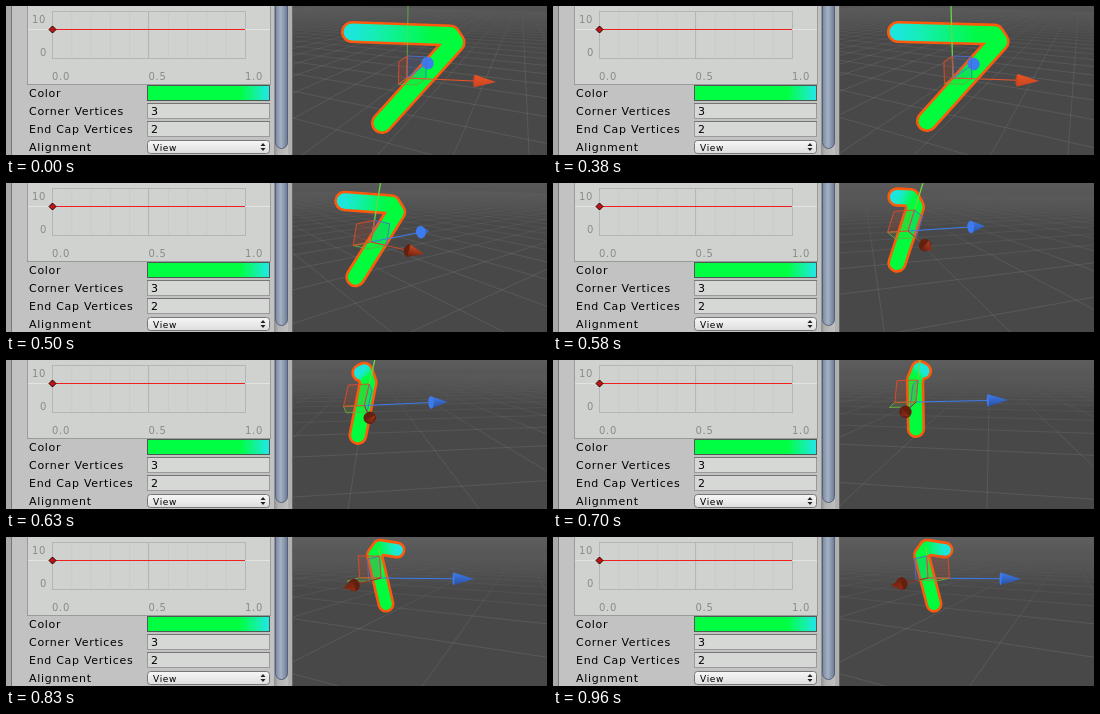
An HTML page with a canvas for the animation above (1.07 s loop, 541 by 149 pixels).

```html
<!DOCTYPE html>
<html lang="en">
<head>
<meta charset="utf-8">
<title>Line corner settings</title>
<style>
html, body { margin: 0; width: 100%; height: 100%; overflow: hidden; background: #c2c2c2; }
canvas { display: block; width: 541px; height: 149px; }
</style>
</head>
<body>
<canvas id="stage" width="541" height="149"></canvas>
<script>
const ctx = document.getElementById('stage').getContext('2d');
const W = 541, H = 149, LEFT = 287, LOOP = 1070;
const FOCAL = 260, CENTER = 400, DEPTH = 3.6, AXIS = 92;
const BLUE = '#3d7cee', GREEN = '#62dc3c';

// The view only refreshes at these moments.
const steps = [0, 380, 400, 420, 500, 540, 580, 630, 665, 700, 780, 805, 830, 890];

// a, b, c: line points; w: half width; o: pivot; x, z: arrow vectors; y: top of the green axis
const poses = [
  { at: 0,   a: [346, 26], b: [450, 35], c: [376, 117], w: 11,   o: [401, 72], x: [89, 4],  z: [22, -16], y: [402, 0],  h: -12, yaw: 24 },
  { at: 380, a: [345, 26], b: [447, 34], c: [374, 115], w: 11,   o: [400, 72], x: [86, 3],  z: [22, -15], y: [398, 0],  h: -12, yaw: 26 },
  { at: 420, a: [333, 22], b: [419, 33], c: [355, 108], w: 10.8, o: [375, 70], x: [82, 4],  z: [39, -18], y: [379, 0],  h: -9,  yaw: 33 },
  { at: 580, a: [344, 14], b: [363, 22], c: [344, 80],  w: 9.7,  o: [355, 48], x: [24, 20], z: [77, -5],  y: [370, 0],  h: 4,   yaw: 71 },
  { at: 700, a: [370, 11], b: [362, 18], c: [363, 69],  w: 9.1,  o: [363, 42], x: [-15, 14], z: [92, -2], y: [367, 0],  h: 8,   yaw: 98 },
  { at: 830, a: [391, 13], b: [368, 16], c: [380, 67],  w: 8.5,  o: [375, 41], x: [-38, 10], z: [93, 1],  y: [373, 10], h: 10,  yaw: 114 },
  { at: 890, a: [392, 13], b: [368, 16], c: [381, 67],  w: 8.5,  o: [375, 41], x: [-37, 8], z: [93, 1],   y: [373, 10], h: 10,  yaw: 114 }
];

const mix = (p, q, k) => Array.isArray(p) ? p.map((v, i) => mix(v, q[i], k)) : p + (q - p) * k;
const add = (p, q) => [p[0] + q[0], p[1] + q[1]];
const mul = (p, k) => [p[0] * k, p[1] * k];
const sub = (p, q) => add(p, mul(q, -1));
const len = p => Math.hypot(p[0], p[1]);
const unit = p => mul(p, 1 / len(p));

function poseAt(time) {
  const t = steps.filter(s => s <= time).pop();
  let i = 0;
  while (i < poses.length - 2 && poses[i + 1].at <= t) i++;
  const p = poses[i], q = poses[i + 1];
  const k = (t - p.at) / (q.at - p.at);
  const out = {};
  for (const key in p) out[key] = mix(p[key], q[key], k);
  return out;
}

function box(x, y, w, h, fill) {
  ctx.fillStyle = fill;
  ctx.fillRect(x, y, w, h);
}

function path(points, close) {
  ctx.beginPath();
  points.forEach(p => ctx.lineTo(p[0], p[1]));
  if (close) ctx.closePath();
}

function line(p, q, color, width = 1) {
  path([p, q]);
  ctx.strokeStyle = color;
  ctx.lineWidth = width;
  ctx.stroke();
}

function ramp(p, q, stops) {
  const g = ctx.createLinearGradient(p[0], p[1], q[0], q[1]);
  stops.forEach(([k, color]) => g.addColorStop(k, color));
  return g;
}

function text(str, x, y, size = 11, color = '#000') {
  ctx.font = size + 'px "DejaVu Sans", sans-serif';
  ctx.letterSpacing = '0.7px';
  ctx.fillStyle = color;
  ctx.fillText(str, x, y);
}

function rounded(x, y, w, h, r, fill, edge) {
  ctx.beginPath();
  ctx.roundRect(x + .5, y + .5, w - 1, h - 1, r);
  ctx.fillStyle = fill;
  ctx.fill();
  ctx.strokeStyle = edge;
  ctx.lineWidth = 1;
  ctx.stroke();
}

function drawCurve() {
  box(21, 0, 244, 79, '#9a9a9a');
  box(22, 0, 242, 78, '#d0d2d0');
  for (let i = 1; i < 10; i++) line([46.5 + 19.3 * i, 5], [46.5 + 19.3 * i, 52], '#c9cbc9');
  for (const x of [46.5, 142.5, 239.5]) line([x, 5], [x, 52], '#b4b6b4');
  for (const y of [5.5, 52.5]) line([46, y], [240, y], '#b4b6b4');
  line([22, 23.5], [264, 23.5], '#e2e4e2');
  line([46, 23.5], [239, 23.5], '#f02020');
  path([[46.5, 20], [50, 23.5], [46.5, 27], [43, 23.5]], true);
  ctx.fillStyle = '#c01414';
  ctx.fill();
  ctx.strokeStyle = '#220000';
  ctx.stroke();
  const gray = '#8a8a8a';
  text('10', 26, 17, 10, gray);
  text('0', 34, 50, 10, gray);
  ['0.0', '0.5', '1.0'].forEach((s, i) => text(s, 46 + 96.5 * i, 74, 10, gray));
}

function drawField(y, value) {
  box(141, y, 123, 16, '#9a9a9a');
  box(141, y, 123, 1, '#747474');
  box(142, y + 1, 121, 14, '#d6d8d6');
  text(value, 145, y + 12);
}

function drawInspector() {
  box(0, 0, LEFT, H, '#c2c2c2');
  box(0, 0, 5, H, '#a9a9a9');
  box(5, 0, 1, H, '#787878');
  drawCurve();
  ['Color', 'Corner Vertices', 'End Cap Vertices', 'Alignment']
    .forEach((s, i) => text(s, 23, 91 + 18 * i));

  box(141, 79, 123, 16, '#4c5c52');
  box(142, 80, 121, 14, ramp([142, 0], [263, 0],
    [[0, '#00ff42'], [.76, '#00ff42'], [1, '#22e6e8']]));
  drawField(97, '3');
  drawField(115, '2');

  rounded(141, 134, 123, 14, 3, ramp([0, 134], [0, 148], [[0, '#f8f8f8'], [1, '#dcdcdc']]), '#777');
  text('View', 147, 145, 9);
  ctx.fillStyle = '#222';
  path([[254.5, 140], [257, 137], [259.5, 140]], true);
  ctx.fill();
  path([[254.5, 142], [257, 145], [259.5, 142]], true);
  ctx.fill();

  box(268, 0, 14, H, ramp([268, 0], [282, 0], [[0, '#8f8f8f'], [.3, '#b2b2b2'], [1, '#c0c0c0']]));
  rounded(269, -12, 13, 155, 6,
    ramp([269, 0], [282, 0], [[0, '#76859c'], [.45, '#a5b1c4'], [1, '#68768d']]), '#55617a');
  box(282, 0, 5, H, '#b0b0b0');
  box(286, 0, 1, H, '#666');
}

function drawGround(p) {
  box(LEFT, 0, W - LEFT, H, ramp([0, p.h - 10], [0, p.h + 42], [[0, '#5e5e5e'], [1, '#484848']]));
  const yaw = p.yaw * Math.PI / 180, cos = Math.cos(yaw), sin = Math.sin(yaw);
  const side = (p.o[0] - CENTER) * DEPTH / FOCAL;
  const drop = (p.o[1] - p.h) * DEPTH / FOCAL;
  const view = (u, v) => [side + u * cos + v * sin, DEPTH - u * sin + v * cos];
  const project = ([x, z]) => [CENTER + FOCAL * x / z, p.h + FOCAL * drop / z];
  const near = .3, span = 16, gap = .5;
  const tint = ramp([0, p.h + 6], [0, p.h + 75],
    [[0, 'rgba(150,150,150,0)'], [1, 'rgba(150,150,150,.2)']]);

  function gridLine(s, e) {
    if (s[1] < near && e[1] < near) return;
    if (s[1] > e[1]) [s, e] = [e, s];
    if (s[1] < near) s = mix(s, e, (near - s[1]) / (e[1] - s[1]));
    line(project(s), project(e), tint);
  }
  for (let k = -span; k <= span; k += gap) {
    gridLine(view(k, -span), view(k, span));
    gridLine(view(-span, k), view(span, k));
  }
}

function drawRibbon(p) {
  const toA = unit(sub(p.a, p.b)), toC = unit(sub(p.c, p.b));
  const bend = add(add(p.b, mul(toA, 6)), [0, -5]);
  const corner = add(p.b, mul(toC, 2));
  const inner = p.w * 2 - 5.2;
  ctx.lineCap = ctx.lineJoin = 'round';
  path([p.a, bend, corner, p.c]);
  ctx.strokeStyle = '#ff5a0c';
  ctx.lineWidth = p.w * 2;
  ctx.stroke();
  path([p.a, bend, corner]);
  ctx.strokeStyle = ramp(p.a, p.b, [[0, '#1ce6dc'], [.25, '#14eeb0'], [.75, '#00fa48'], [1, '#00fc3c']]);
  ctx.lineWidth = inner;
  ctx.stroke();
  line(corner, p.c, '#00fc3c', inner);
  ctx.lineCap = 'butt';
  ctx.lineJoin = 'miter';
}

function drawCone(o, axis, color, dark, away) {
  const size = len(axis), flat = Math.min(1, size / AXIS);
  const turn = Math.sqrt(1 - flat * flat);
  const base = add(o, mul(axis, away ? 1 - .22 * flat : .78 - .08 * turn));
  const tip = add(o, axis);
  const r = 6.3, angle = Math.atan2(axis[1], axis[0]);
  const normal = [-axis[1] / size * r, axis[0] / size * r];
  const disc = fill => {
    ctx.beginPath();
    ctx.ellipse(base[0], base[1], Math.max(1, r * turn), r, angle, 0, Math.PI * 2);
    ctx.fillStyle = fill;
    ctx.fill();
  };
  line(o, base, color);
  if (!away) disc(dark);
  path([add(base, normal), tip, sub(base, normal)], true);
  ctx.fillStyle = ramp(sub(base, normal), add(base, normal), [[0, color], [1, dark]]);
  ctx.fill();
  if (away) disc(color);
}

function drawPlane(o, u, v, color) {
  path([o, add(o, u), add(add(o, u), v), add(o, v)], true);
  ctx.globalAlpha = .16;
  ctx.fillStyle = color;
  ctx.fill();
  ctx.globalAlpha = .9;
  ctx.strokeStyle = color;
  ctx.lineWidth = 1;
  ctx.stroke();
  ctx.globalAlpha = 1;
}

function drawGizmo(p, time) {
  const reach = v => mul(v, .45 - .22 * Math.min(1, len(v) / AXIS));
  const side = time < 960 ? -1 : 1;
  const up = mul(unit(sub(p.y, p.o)), 22);
  const qx = mul(reach(p.x), .9), qz = mul(reach(p.z), side);
  ctx.globalAlpha = time < 380 ? .5 : 1;
  line(p.o, p.y, GREEN, 1.3);
  ctx.globalAlpha = 1;
  drawCone(p.o, p.z, BLUE, '#2c4f9e', true);
  drawPlane(p.o, qx, up, '#4a6ed0');
  drawPlane(p.o, qx, qz, '#69ad3f');
  drawPlane(p.o, qz, up, '#e04c28');
  const shade = Math.min(1, Math.max(0, (p.yaw - 33) / 60));
  const red = mix([236, 84, 40], [150, 44, 22], shade).map(Math.round);
  drawCone(p.o, p.x, `rgb(${red})`, shade > .3 ? '#64200f' : '#c8441f', false);
}

function frame(now) {
  const time = now % LOOP;
  const p = poseAt(time);
  ctx.save();
  ctx.beginPath();
  ctx.rect(LEFT, 0, W - LEFT, H);
  ctx.clip();
  drawGround(p);
  drawRibbon(p);
  drawGizmo(p, time);
  ctx.restore();
  drawInspector();
}

const start = performance.now();
function tick() {
  frame(performance.now() - start);
  requestAnimationFrame(tick);
}
tick();
</script>
</body>
</html>
```
